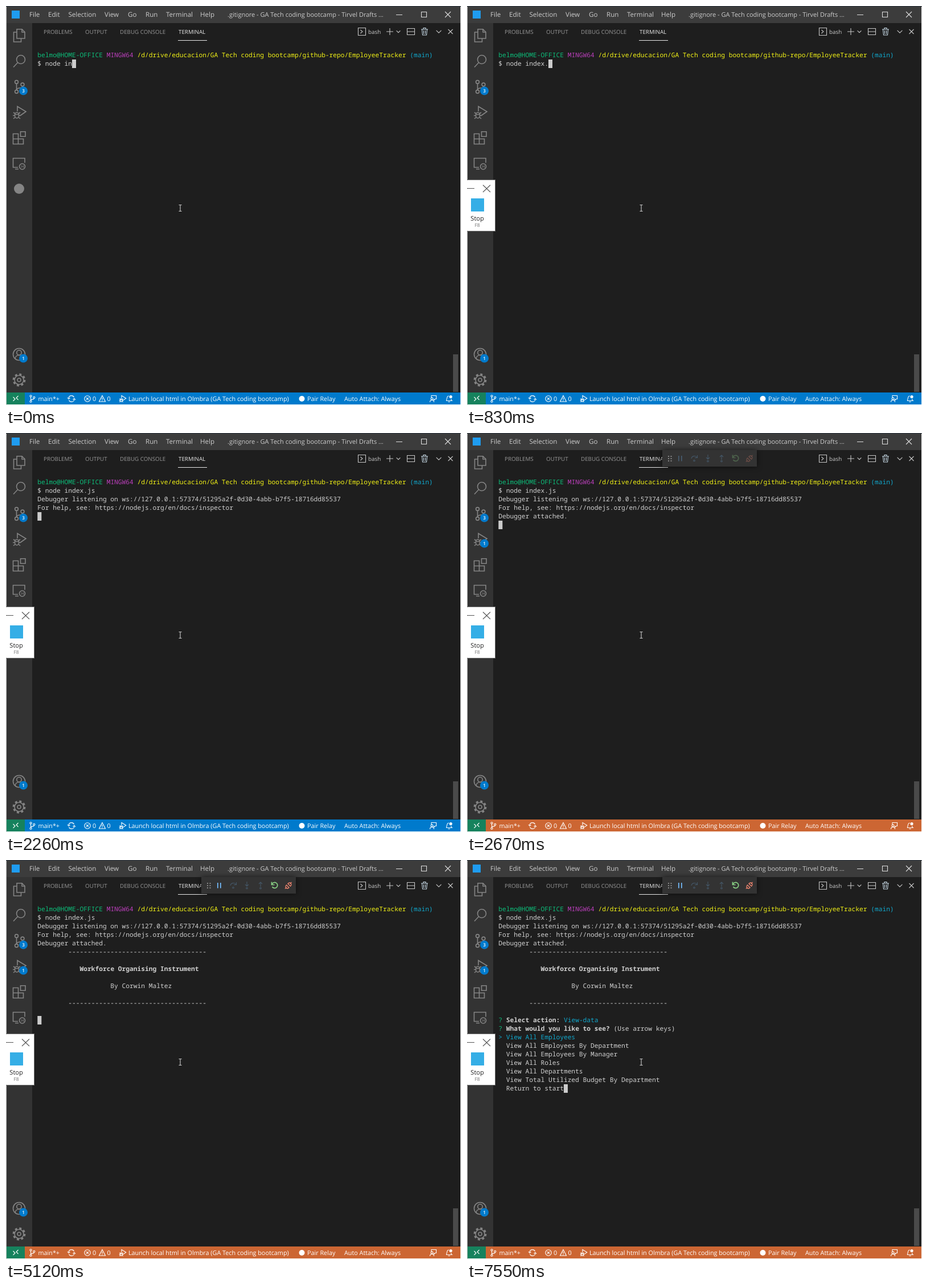
Recreate the animation shown at these times as an HTML page. Size 799x701 px, loop 8 s.

```html
<!DOCTYPE html>
<html lang="en">
<head>
<meta charset="utf-8">
<title>Terminal session</title>
<style>
  html, body { margin: 0; width: 100%; height: 100%; overflow: hidden; background: #fff; }
  svg { display: block; }
  text { text-rendering: geometricPrecision; white-space: pre; font-family: "Open Sans", sans-serif; }
  .menu { font-size: 11.6px; fill: #ccc; }
  .title { font-size: 11px; fill: #ccc; }
  .tab { font-size: 9.8px; fill: #979797; }
  .tab.on { fill: #e7e7e7; }
  .status text { font-size: 10.8px; fill: #fff; }
  .line { fill: none; stroke-width: 1.1; }
  .line *, defs * { vector-effect: non-scaling-stroke; }
  .side { stroke: #858585; stroke-width: 1.6; }
  .badge text { font-size: 8px; font-weight: 600; fill: #fff; text-anchor: middle; }
  #terminal text { font: 500 11.24px "Noto Sans Mono", monospace; fill: #d0d0d0; }
  #terminal .green { fill: #0dbc79; }
  #terminal .magenta { fill: #bc3fbc; }
  #terminal .yellow { fill: #f0f016; }
  #terminal .cyan { fill: #11a8cd; }
  #terminal .bold { font-weight: 700; }
  #toolbar .panel { fill: #333; filter: drop-shadow(0 0 5px rgba(0, 0, 0, .6)); }
</style>
</head>
<body>
<svg width="799" height="701" viewBox="0 0 799 701">
  <defs>
    <g id="branch">
      <circle cx="-4.5" cy="-8.5" r="2.9"/><circle cx="-4.5" cy="8.5" r="2.9"/><circle cx="6" cy="-4" r="2.9"/>
      <path d="M-4.5-5.6V5.6M6-1C6 4-4.5 0-4.5 5.6"/>
    </g>
    <g id="debug">
      <path d="M-4-2V-10.500L11-1.500L1 5.500"/>
      <ellipse cx="-5" cy="5" rx="3.6" ry="5"/>
      <path d="M-8.500 3.500h7M-11 0l3 2M1 0l-3 2M-12 5.500h3.500M2 5.500h-3.500M-11 11l3-2.500M1 11l-3-2.500"/>
    </g>
    <path id="cross" d="M-1-1L1 1M1-1L-1 1"/>
    <path id="chevron" d="M-4-2L0 2L4-2"/>
  </defs>

  <!-- window surfaces -->
  <rect width="1" height="701" fill="#ccc"/>
  <rect width="799" height="1" fill="#2b333c"/>
  <rect x="1" y="1" width="797" height="29" fill="#3c3c3c"/>
  <rect x="1" y="30" width="45" height="649" fill="#333"/>
  <rect x="46" y="30" width="752" height="649" fill="#1e1e1e"/>
  <rect x="785" y="612" width="9" height="66" fill="#4a4a4a"/>

  <!-- title bar -->
  <rect x="10" y="8" width="14" height="14" fill="#1f9cf0"/>
  <g id="menus"></g>
  <text class="title" x="389" y="19">.gitignore - GA Tech coding bootcamp - Tirvel Drafts ...</text>
  <g class="line" stroke="#ddd">
    <path d="M685 15.500h11M729.500 10.500h9v9h-9z"/>
    <use href="#cross" transform="translate(776 15)scale(5)"/>
  </g>

  <!-- panel header -->
  <g id="tabs"></g>
  <rect x="302" y="60" width="51" height="1" fill="#e7e7e7"/>
  <text x="636" y="49" font-size="9.800" fill="#ccc">bash</text>
  <g class="line" stroke="#c5c5c5">
    <path d="M618.500 38.500h13v13h-13zM622.500 42l3.500 3l-3.500 3M668 45h12M674 39v12"/>
    <path d="M704.500 39.500h13v11h-13zM704.500 45h13"/>
    <path stroke="#c5d8e4" d="M729 41h12M733 41v-2.500h4v2.500M730.500 41l1 10h7l1-10M733.500 43v6M736.500 43v6"/>
    <use href="#chevron" transform="translate(689 45)scale(.85)"/>
    <use href="#chevron" transform="translate(760 45)scale(1.100)"/>
    <use href="#cross" transform="translate(780.500 45)scale(4)"/>
  </g>

  <!-- activity bar -->
  <g class="line side">
    <path d="M19 40.800h9l5 5V57H19zM28 41v5h5M19 46h-5.500v17h13v-6"/>
    <circle cx="26" cy="94" r="7.500"/><path d="M20.500 99.500L13 107.500"/>
    <use href="#branch" x="23" y="142"/>
    <use href="#debug" x="24" y="187"/>
    <path d="M12.500 224.500h9v18h-9zM12.500 233.500h18v9h-18zM25.500 220.800h8.500v8.500h-8.500z"/>
    <path d="M21 283.500h-8.500v-16h20.500v8M16 286.500h6"/><circle cx="28.500" cy="282" r="5"/>
    <path d="M26.500 280l2 2l-2 2M31 280l-1 2l1 2" stroke-width="1"/>
    <circle cx="23" cy="321" r="9" fill="#858585" stroke="none"/>
    <circle cx="23" cy="612" r="10.500"/><circle cx="23" cy="609" r="4.200"/><path d="M16 619.500c1-8 13-8 14 0"/>
    <circle cx="23" cy="657" r="8"/><circle cx="23" cy="657" r="3"/>
    <circle cx="23" cy="657" r="9.800" stroke-width="3.200" stroke-dasharray="3.900 3.800"/>
  </g>
  <g id="badges" class="badge"></g>

  <!-- status bar -->
  <g class="status">
    <rect id="statusBar" x="33" y="679" width="765" height="21"/>
    <rect x="1" y="679" width="32" height="21" fill="#16825d"/>
    <g class="line" stroke="#fff">
      <path d="M12.500 687l3.500 3.500l-3.500 3.500M21.500 685l-3.500 3.500l3.500 3.500"/>
      <use href="#branch" transform="translate(46 690)scale(.55)"/>
      <path d="M110 689a5 5 0 0 1 9.500-1.500M120 691a5 5 0 0 1-9.500 1.500M108 688l2 2.500l2.500-2M122 692l-2-2.500l-2.500 2"/>
      <circle cx="143" cy="690" r="5.200"/><use href="#cross" transform="translate(143 690)scale(2.200)"/>
      <path d="M169 684.500l5.500 10.500h-11zM169 688v4M169 693v1"/>
      <use href="#debug" transform="translate(205 690)scale(.52)"/>
      <path d="M747 688v-3.500h8.500v6h-2l-2 2v-2M744.500 696c0-5 7-5 7 0"/><circle cx="748" cy="690" r="1.900"/>
      <path d="M773 693.500c2-2 0-8 4.500-8.500M773 693.500h10c-1.500-1-1.500-2-1.500-3.500M776.500 695.500h3"/>
    </g>
    <circle cx="781" cy="686.500" r="2.600" fill="#fff"/>
    <circle cx="519.500" cy="690" r="5" fill="#fff"/>
    <g id="statusLabels"></g>
  </g>

  <g id="terminal"></g>

  <!-- debug toolbar -->
  <g id="toolbar">
    <rect class="panel" x="343" y="30" width="166" height="29"/>
    <path d="M354 40v10M358.500 40v10" stroke="#888" stroke-width="2" stroke-dasharray="2 2"/>
    <g class="line" stroke="#75beff" stroke-width="1.300" opacity=".25">
      <path d="M394 45a5.500 5.500 0 0 1 10-2M404.500 39v4.500h-4.500M423 38v8M420 43l3 3l3-3M447 47v-8M444 42l3-3l3 3"/>
      <circle cx="399" cy="48.500" r="1.300"/><circle cx="423" cy="49.500" r="1.300"/><circle cx="447" cy="49.500" r="1.300"/>
    </g>
    <g id="activeTools" class="line" style="stroke-width:1.700">
      <path stroke="#75beff" d="M371.800 40v9.500M376.800 40v9.500"/>
      <path stroke="#89d185" d="M467 43a5 5 0 1 1 .5 4M466.500 38.500v5h5"/>
      <path stroke="#f48771" style="stroke-width:1.300" d="M490 50.500l2.500-2.500M499 41.500l2.500-2.500M492.500 44l4.500 4.500c-2 2-4 1.500-5 .5s-1.500-3 .5-5zM495 41.500l4.500 4.500c2-2 1.500-4 .5-5s-3-1.500-5 .5z"/>
    </g>
  </g>

  <!-- recorder control -->
  <g id="recorder">
    <rect x="-1" y="305.500" width="50.500" height="90" fill="#fff" stroke="#777"/>
    <path class="line" d="M0 320.500h13M28 314.500l13 12.500M41 314.500l-13 12.500" stroke="#555"/>
    <rect x="7" y="338" width="23" height="23" fill="#35aee6"/>
    <text x="18" y="377" font-size="11" fill="#222" text-anchor="middle">Stop</text>
    <text x="18" y="388" font-size="8.500" fill="#777" text-anchor="middle">F8</text>
  </g>

  <path class="line" d="M303.500 349.500h2l.5.5l.5-.5h2M306 350v10M303.500 360.500h2l.5-.5l.5.500h2" stroke="#d0d0d0"/>
</svg>

<script>
const LOOP = 8000;
const KEY_TIMES = [200, 430, 630, 830, 1030, 1250];
const ENTER = 2060, LISTENING = 2260, ATTACHED = 2670, TOOLS_READY = 2880;
const BANNER = 5120, MAIN_MENU = 5520, VIEW_MENU = 7550;
const CHANGES = [...KEY_TIMES, ENTER, LISTENING, ATTACHED, TOOLS_READY, BANNER, MAIN_MENU, VIEW_MENU];
const LEFT = 55.3, TOP = 79, BASELINE = 11, CHAR = 6.744, ROW = 15;

const $ = id => document.getElementById(id);
const show = (id, visible) => { $(id).style.display = visible ? "" : "none"; };
const tint = (style, text) => `<tspan class="${style}">${text}</tspan>`;
const labels = (style, y, items) => items.map(([x, text]) =>
  `<text class="${style}" x="${x}" y="${y}">${text}</text>`).join("");
const badge = (y, count) =>
  `<circle cx="30.500" cy="${y}" r="7.500" fill="#007acc"/><text x="30.500" y="${y + 3}">${count}</text>`;

$("menus").innerHTML = labels("menu", 19, [[41, "File"], [74, "Edit"], [109.5, "Selection"], [173, "View"],
  [214, "Go"], [245, "Run"], [281, "Terminal"], [341, "Help"]]);
$("tabs").innerHTML = labels("tab", 49, [[66, "PROBLEMS"], [139, "OUTPUT"], [200, "DEBUG CONSOLE"]])
  + labels("tab on", 49, [[303, "TERMINAL"]]);
$("statusLabels").innerHTML = labels("", 694, [[56.5, "main*+"], [152, "0"], [177.5, "0"],
  [215, "Launch local html in Olmbra (GA Tech coding bootcamp)"], [529, "Pair Relay"], [594, "Auto Attach: Always"]]);

const prompt = [
  tint("green", "belmo@HOME-OFFICE"), tint("magenta", "MINGW64"),
  tint("yellow", "/d/drive/educacion/GA Tech coding bootcamp/github-repo/EmployeeTracker"),
  tint("cyan", "(main)")
].join(" ");
const rule = " ".repeat(8) + "-".repeat(36);
const banner = [rule, "", " ".repeat(11) + tint("bold", "Workforce Organising Instrument"), "",
  " ".repeat(19) + "By Corwin Maltez", "", rule, ""];
const question = (text, answer) => `${tint("green", "?")} ${tint("bold", text)} ${answer}`;
const choices = ([first, ...rest]) => [tint("cyan", "&gt; " + first), ...rest.map(item => "  " + item)];
const hint = "(Use arrow keys)";
const mainMenu = [question("Select action:", hint),
  ...choices(["View-data", "Add-data", "Update-data", "Remove-data", "Exit-Application"])];
const viewMenu = [question("Select action:", tint("cyan", "View-data")),
  question("What would you like to see?", hint),
  ...choices(["View All Employees", "View All Employees By Department", "View All Employees By Manager",
    "View All Roles", "View All Departments", "View Total Utilized Budget By Department", "Return to start"])];

function terminalAt(time) {
  const typed = KEY_TIMES.filter(key => key <= time).length;
  const command = "$ node in" + "dex.js".slice(0, typed);
  const rows = [prompt, command];
  if (time >= LISTENING) rows.push(
    "Debugger listening on ws://127.0.0.1:57374/51295a2f-0d30-4abb-b7f5-18716dd85537",
    "For help, see: https://nodejs.org/en/docs/inspector");
  if (time >= ATTACHED) rows.push("Debugger attached.");
  if (time >= BANNER) rows.push(...banner);

  let cursor = time < ENTER ? [command.length, 1] : [0, rows.length];
  if (time >= VIEW_MENU) {
    rows.push(...viewMenu);
    cursor = [rows.at(-1).length, rows.length - 1];
  } else if (time >= MAIN_MENU) {
    rows.push(...mainMenu);
    cursor = null;
  }
  return { rows, cursor };
}

function render(time) {
  const { rows, cursor } = terminalAt(time);
  const text = rows.map((row, i) => `<text x="${LEFT}" y="${TOP + BASELINE + i * ROW}">${row}</text>`).join("");
  const block = cursor
    ? `<rect x="${LEFT + cursor[0] * CHAR}" y="${TOP + cursor[1] * ROW}" width="7" height="15" fill="#ccc"/>` : "";
  $("terminal").innerHTML = text + block;

  const debugging = time >= ATTACHED;
  $("statusBar").setAttribute("fill", debugging ? "#cc6633" : "#007acc");
  $("badges").innerHTML = badge(149, 3) + badge(619, 1) + (debugging ? badge(194, 1) : "");
  $("activeTools").setAttribute("opacity", time >= TOOLS_READY ? 1 : .3);
  show("toolbar", debugging);
  show("recorder", time >= KEY_TIMES[0]);
}

let lastStep = -1;
function tick() {
  const time = performance.now() % LOOP;
  const step = CHANGES.filter(change => change <= time).length;
  if (step !== lastStep) render(time);
  lastStep = step;
  requestAnimationFrame(tick);
}
tick();
</script>
</body>
</html>
```
